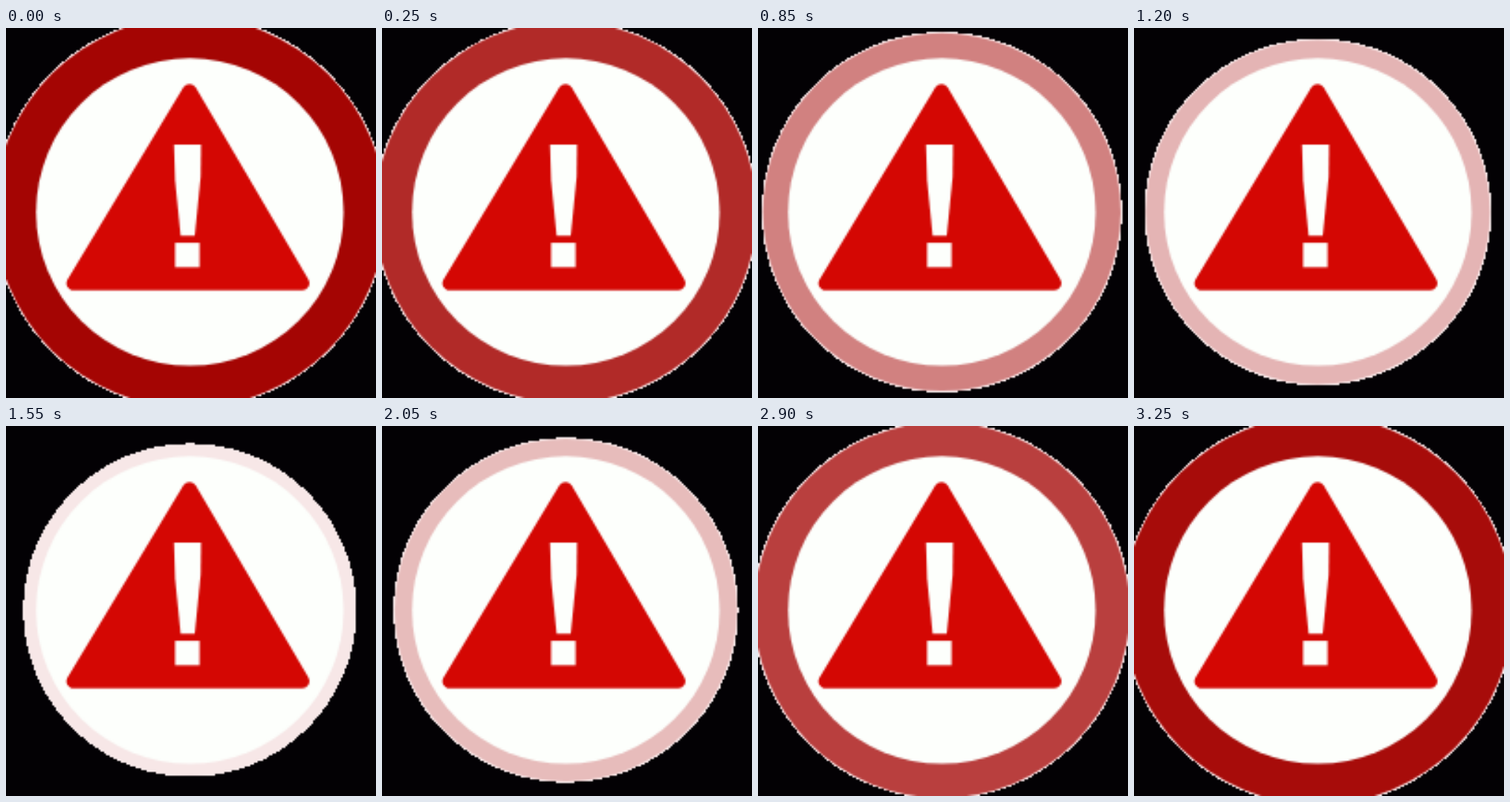
Recreate the animation shown at these times as an HTML page with a canvas. Size 498 by 498 pixels, loop 3300 ms.

```html
<!DOCTYPE html>
<html lang="en">
<head>
<meta charset="utf-8">
<title>Pulsing warning sign</title>
<style>
  html, body { margin: 0; width: 100%; height: 100%; overflow: hidden; background: #030104; }
  canvas { display: block; width: 498px; height: 498px; }
</style>
</head>
<body>
<canvas id="stage" width="498" height="498"></canvas>
<script>
const SIZE = 498, GRID = 200, CELL = SIZE / GRID;
const LOOP = 3300, STEP = 50;
const CX = 247.4, CY = 247.7;
const BLACK = '#030104', WHITE = '#fdfffc', RED = '#d40703', RIM = '#fbeeee';
const DARK = [164, 5, 3], PALE = [252, 246, 246];
const R_MAX = 264.7, R_MIN = 221.5;

const screen = document.getElementById('stage').getContext('2d');

// The sign is drawn small, then enlarged with smoothing for soft edges
const small = document.createElement('canvas');
small.width = small.height = GRID;
const ctx = small.getContext('2d');
ctx.scale(1 / CELL, 1 / CELL);

const mix = (a, b, p) => a + (b - a) * p;

function disc(r, color) {
  ctx.fillStyle = color;
  ctx.beginPath();
  ctx.arc(CX, CY, r, 0, Math.PI * 2);
  ctx.fill();
}

// Disc without antialiasing, one grid row at a time
function steppedDisc(r, color) {
  ctx.fillStyle = color;
  for (let row = 0; row < GRID; row++) {
    const dy = (row + 0.5) * CELL - CY;
    if (Math.abs(dy) >= r) continue;
    const half = Math.sqrt(r * r - dy * dy);
    const left = Math.round((CX - half) / CELL);
    const right = Math.round((CX + half) / CELL);
    ctx.fillRect(left * CELL, row * CELL, (right - left) * CELL, CELL);
  }
}

function polygon(points, color) {
  ctx.fillStyle = color;
  ctx.beginPath();
  points.forEach(([x, y]) => ctx.lineTo(x, y));
  ctx.fill();
}

function triangle() {
  ctx.fillStyle = RED;
  ctx.beginPath();
  ctx.moveTo(245, 353);
  ctx.arcTo(74, 353, 247, 66, 9.5);
  ctx.arcTo(247, 66, 415.5, 353, 9.5);
  ctx.arcTo(415.5, 353, 245, 353, 9.5);
  ctx.fill();
}

function draw(t) {
  const fade = 1 - Math.abs(1 - 2 * t / LOOP);
  const radius = mix(R_MAX, R_MIN, fade);
  const rgb = DARK.map((c, i) => Math.round(mix(c, PALE[i], fade)));

  ctx.fillStyle = BLACK;
  ctx.fillRect(0, 0, SIZE, SIZE);
  steppedDisc(radius, RIM);
  disc(radius - 1.8, `rgb(${rgb})`);
  disc(207, WHITE);
  triangle();
  polygon([[226, 157], [262.5, 157], [262, 200], [254, 279.5], [235, 279.5], [227.5, 205]], WHITE);
  polygon([[227.5, 289], [260.5, 289], [260.5, 322], [227.5, 322]], WHITE);

  screen.drawImage(small, 0, 0, SIZE, SIZE);
}

function tick() {
  const t = performance.now() % LOOP;
  draw(Math.floor(t / STEP) * STEP);
  requestAnimationFrame(tick);
}
tick();
</script>
</body>
</html>
```
